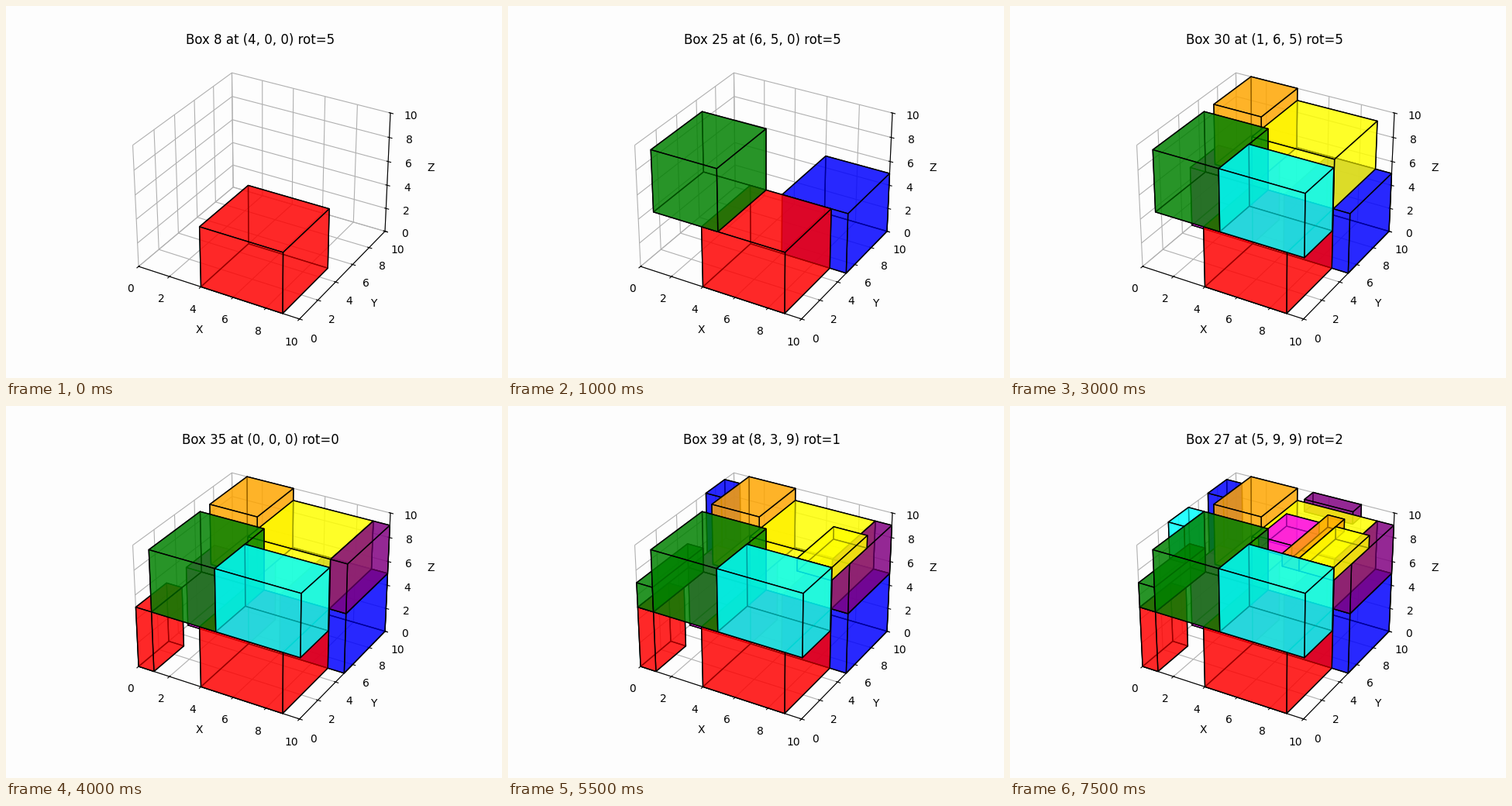
Write a matplotlib script that moves like this. It is 640 px wide and 480 px high and loops after 8000 ms.

```python
import itertools

import matplotlib.pyplot as plt
import numpy as np
from matplotlib.animation import FuncAnimation
from mpl_toolkits.mplot3d.art3d import Poly3DCollection

SIDE = 10
BACKGROUND = "#fdfdfd"
COLORS = ["red", "green", "blue", "yellow", "cyan", "magenta", "orange", "purple"]

plt.rcParams["figure.facecolor"] = BACKGROUND
plt.rcParams["axes.facecolor"] = BACKGROUND

fig = plt.figure(figsize=(6.4, 4.8), dpi=100)
ax = fig.add_subplot(projection="3d")
ax.set(xlim=(0, SIDE), ylim=(0, SIDE), zlim=(0, SIDE),
       xlabel="X", ylabel="Y", zlabel="Z")
for axis in (ax.xaxis, ax.yaxis, ax.zaxis):
    axis.set_pane_color(BACKGROUND)

tops = np.zeros((SIDE, SIDE), int)  # height of the pile over each floor cell
palette = itertools.cycle(COLORS)
solids, titles = [], []


def free_run(cells, limit):
    """Count cells from the corner to the first full one, up to the limit."""
    full = np.flatnonzero(cells >= SIDE)
    return min(limit, int(full[0]) if full.size else len(cells))


def box_faces(x, y, z, w, d, h):
    base = [(x, y), (x + w, y), (x + w, y + d), (x, y + d)]
    low = [(a, b, z) for a, b in base]
    high = [(a, b, z + h) for a, b in base]
    sides = [[low[i - 1], low[i], high[i], high[i - 1]] for i in range(4)]
    return [low, high] + sides


def place(number, x, y, w=5, d=5, h=5):
    """Fill the room at a floor corner up to the limits, resting on the pile."""
    w, d = free_run(tops[x:, y], w), free_run(tops[x, y:], d)
    area = tops[x:x + w, y:y + d]
    z = int(area.max())
    h = min(h, SIDE - z)
    area[:] = z + h

    step = len(solids)
    rot = 5 if step < 8 else (step - 8) // 3
    titles.append(f"Box {number} at {(x, y, z)} rot={rot}")
    solid = Poly3DCollection(
        box_faces(x, y, z, w, d, h), facecolors=next(palette),
        edgecolors="black", linewidths=1, alpha=0.6, visible=False,
    )
    solids.append(ax.add_collection3d(solid))


place(8, 4, 0)
place(4, 1, 0, w=4)
place(25, 6, 5)
place(14, 4, 5, h=4)
place(23, 5, 0, d=3)
place(11, 0, 5, w=4, d=3)
place(30, 1, 6, w=3)
place(31, 9, 5, h=4)
place(35, 0, 0, d=3)
place(26, 0, 0, h=2)
place(18, 0, 7, d=2)
place(39, 8, 3, d=4)
place(6, 0, 3, d=2)
place(9, 5, 4, w=2, d=3)
place(16, 7, 3)
place(27, 5, 9, w=3)


def update(step):
    for i, solid in enumerate(solids):
        solid.set_visible(i <= step)
    ax.set_title(titles[step])
    return solids


anim = FuncAnimation(fig, update, frames=len(solids), interval=500, repeat=True)
plt.show()
```
